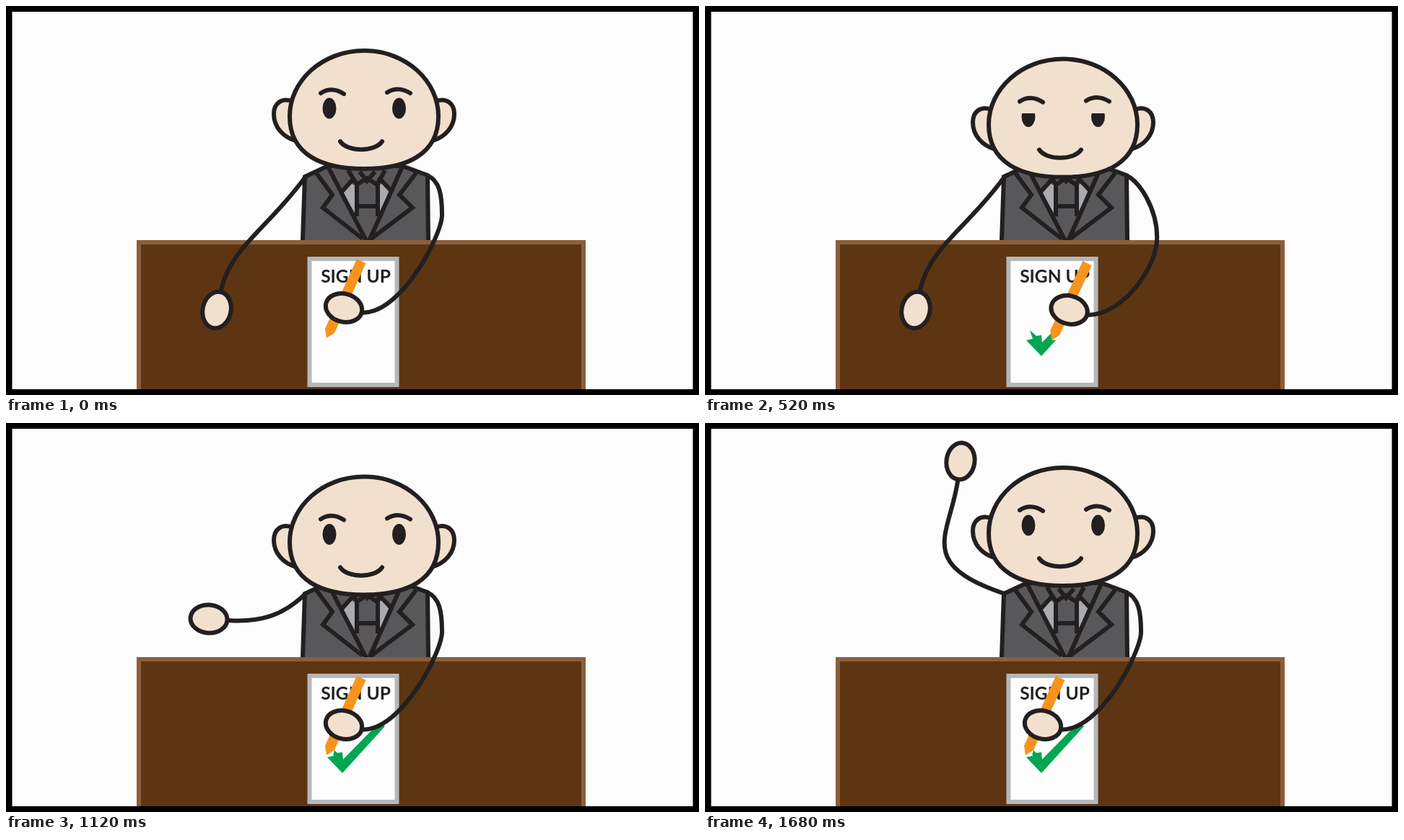
An HTML page that plays this animation: 960x540 px, repeating every 1920 ms.

```html
<!DOCTYPE html>
<html lang="en">
<head>
<meta charset="utf-8">
<title>Sign up</title>
<style>
  html, body { margin: 0; height: 100%; overflow: hidden; background: #000; }
  svg { display: block; width: 100vw; height: 100vh; }
  .ink { fill: none; stroke: #231f20; stroke-width: 6; }
  .skin { fill: #f2e0cf; }
  .suit { fill: #58575a; }
  .shirt { fill: #a9abae; stroke: none; }
  .round { stroke-linecap: round; }
  text { font: 700 24.5px Lato, "Open Sans", sans-serif; fill: #231f20; text-anchor: middle; }
</style>
</head>
<body>
<svg viewBox="0 0 960 540">
  <clipPath id="drawn"><rect id="reveal" x="440" y="400" height="100"/></clipPath>
  <rect x="8.5" y="8" width="943" height="524" fill="#fcfcfc"/>

  <g class="ink">
    <path class="suit" d="M411 325L414 237L446 222H549L584 235L585 325"/>
    <path class="shirt" d="M477 246L486 250V292L467 260ZM522 246L514 250V292L532 260Z"/>
    <path d="M430 232L452 262L439 280L494 323M568 232L545 262L563 280L506 323"/>
    <path d="M446 223L499 326M549 223L503 326"/>
    <path d="M465 258L483 238M535 258L516 238M474 228L486 248L500 239L514 248L525 228M486 246V292M515 246V292M486 278H515M490 230L500 243L511 230"/>
  </g>

  <g id="head" class="ink">
    <path class="skin" d="M396 132C382 127 371 135 371 150C371 168 384 182 401 187M596 132C610 127 621 135 621 150C621 168 608 182 591 187"/>
    <path class="skin" d="M496 62C554 62 599 104 599 153C599 206 555 226 496 226C437 226 393 206 393 153C393 104 438 62 496 62Z"/>
    <path class="round" d="M436 121Q451 111 468 122M528 120Q543 110.5 560 121M463 188C473 203 511 203 521 188"/>
    <g fill="#231f20" stroke="none">
      <ellipse cx="448" cy="142" rx="9.5" ry="14.5"/>
      <ellipse cx="544.5" cy="142" rx="9.5" ry="14.5"/>
      <path id="lids" class="skin"/>
    </g>
  </g>

  <path fill="#8b5e3c" d="M181 325H803V532H181Z"/>
  <path fill="#5d3512" d="M187 331H797V532H187Z"/>
  <rect x="420.5" y="351" width="121" height="175" fill="#fdfdfd" stroke="#b5b7b9" stroke-width="6"/>
  <text x="484.5" y="384">SIGN UP</text>
  <path clip-path="url(#drawn)" fill="#00a651" d="M445 464L454 462L450 450L459 458L466 457L467 467L516 417L525 421L466 486Z"/>

  <g id="pen">
    <path fill="#fdfdfd" d="M455 454L453 461L444 461Z"/>
    <path fill="#f7941d" d="M486 351L498.5 357L455 454L444 461L442 448Z"/>
  </g>
  <path id="penArm" class="ink"/>
  <path id="waveArm" class="ink"/>
  <ellipse id="penHand" class="ink skin" rx="19.5" ry="25.5"/>
  <ellipse id="waveHand" class="ink skin" rx="19.5" ry="25.5"/>
</svg>
<script>
const LOOP = 1920, STEP = 40, DRAWN = 820;
const REST = [468, 419];
const el = id => document.getElementById(id);
const ramp = (t, from, to) => Math.min(1, Math.max(0, (t - from) / (to - from)));

// Time, then hand x and y: down the tick, up the tick, back to rest.
const penPath = [
  [40, ...REST], [360, 490, 441], [DRAWN, 532, 386], [960, 493, 410], [1120, ...REST]
];
// Time, then hand x and y, tilt, and the point the arm bends towards.
const wavePoses = [
  [920, 292, 422, 12, 362, 310],
  [1120, 281, 272, 94, 383, 268],
  [1440, 299, 195, 148, 380, 333],
  [1680, 354, 53, 188, 290, 195]
];

function at(keys, t) {
  const last = keys.length - 1;
  const i = Math.max(1, keys.findIndex((key, n) => key[0] >= t || n === last));
  const a = keys[i - 1], b = keys[i], k = ramp(t, a[0], b[0]);
  return a.map((v, n) => v + (b[n] - v) * k).slice(1);
}

// Places a hand and returns the direction from its centre to the wrist.
function placeHand(id, x, y, tilt) {
  el(id).setAttribute("transform", `translate(${x} ${y}) rotate(${tilt})`);
  const angle = tilt * Math.PI / 180;
  return [Math.sin(angle), -Math.cos(angle)];
}

function drawHead(t) {
  const drop = 12.5 * (ramp(t, 40, 560) - ramp(t, 1440, 1680));
  const lid = 12 * (ramp(t, 80, 360) - ramp(t, 760, 920));
  el("head").setAttribute("transform", `translate(0 ${drop})`);
  el("lids").setAttribute("d", `M436 125.5h24v${lid}h-24ZM532 125.5h24v${lid}h-24Z`);
}

function drawPen(t) {
  const [x, y] = at(penPath, t);
  const dx = x - REST[0], dy = y - REST[1], turn = dy / 5;
  const [ux, uy] = placeHand("penHand", x, y, 104.5 + turn);
  const wx = x + 27 * ux, wy = y + 27 * uy;
  // The elbow follows the hand and swings outwards.
  const ex = 604 + .55 * dx + .73 * dy, ey = 290 + .79 * dx + .98 * dy;
  el("pen").setAttribute("transform",
    `translate(${dx} ${dy}) rotate(${turn} ${REST})`);
  el("penArm").setAttribute("d",
    `M583 235C601 242 ${ex} ${ey - .45 * (ey - 230)} ${ex} ${ey}` +
    `S${wx + (ex - wx) / 2} ${wy} ${wx} ${wy}`);
  el("reveal").setAttribute("width", t < DRAWN ? 1.3 * dx : 100);
}

function drawWave(t) {
  const [x, y, tilt, bx, by] = at(wavePoses, t);
  const [ux, uy] = placeHand("waveHand", x, y, tilt);
  const wx = x + 27 * ux, wy = y + 27 * uy;
  const reach = .58 * Math.hypot(bx - wx, by - wy);
  el("waveArm").setAttribute("d",
    `M415 237C${bx} ${by} ${wx + reach * ux} ${wy + reach * uy} ${wx} ${wy}`);
}

function tick() {
  const t = Math.floor(performance.now() % LOOP / STEP) * STEP;
  drawHead(t);
  drawPen(t);
  drawWave(t);
  requestAnimationFrame(tick);
}
tick();
</script>
</body>
</html>
```
